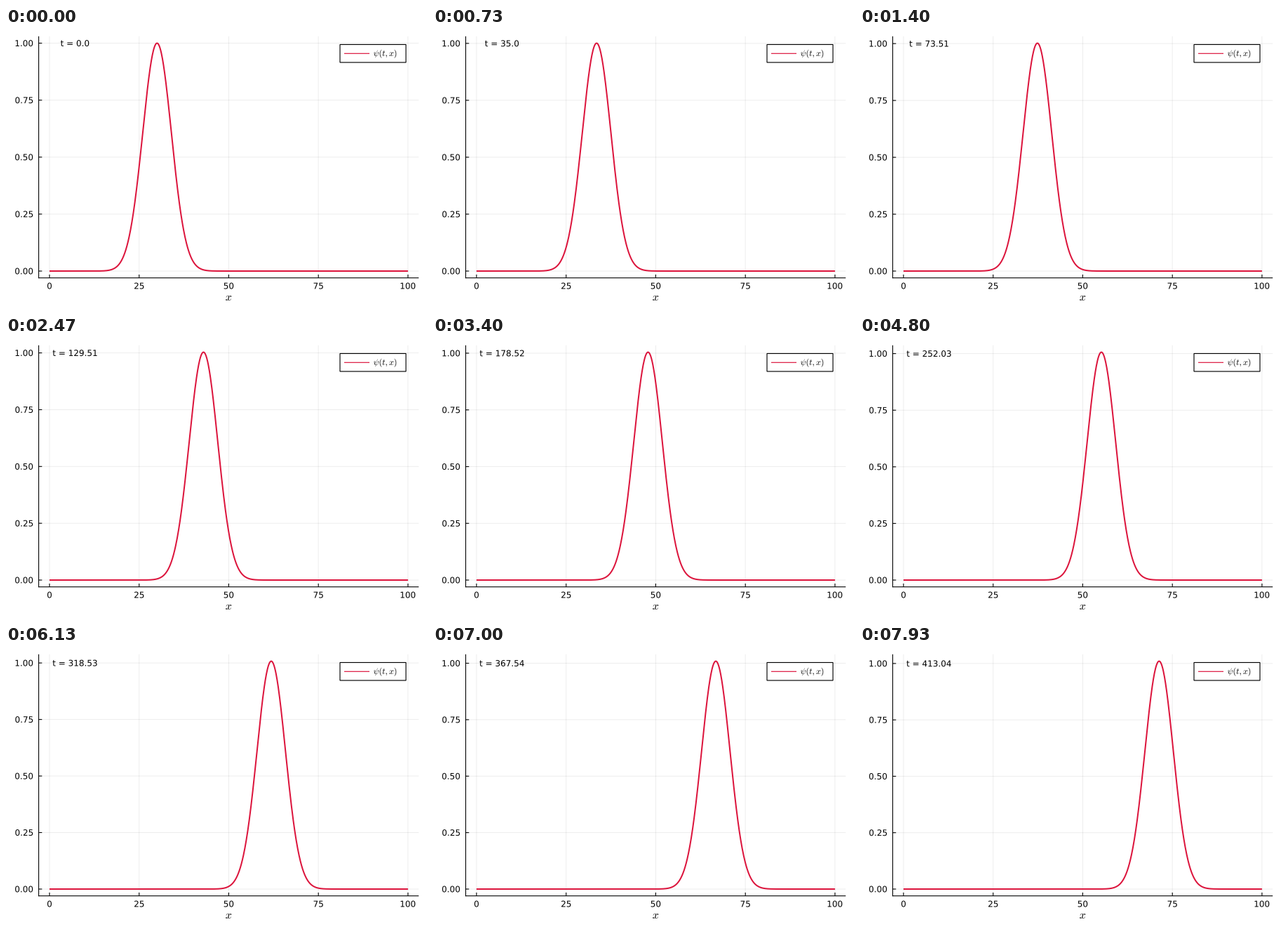
Write a matplotlib script that moves like this. It is 600 by 400 pixels and loops after 8000 ms.

```python
import numpy as np
import matplotlib.pyplot as plt
from matplotlib.animation import FuncAnimation
from matplotlib.patches import PathPatch, Rectangle
from matplotlib.textpath import TextPath
from matplotlib.transforms import Affine2D

W, H, DPI = 600, 400, 100
PX = 72 / DPI
FRAMES, LOOP = 120, 8000
STEP = 35 * 1000 / 9999
CRIMSON = "#dc143c"

plt.rcParams["font.family"] = "DejaVu Sans"
plt.rcParams["mathtext.fontset"] = "cm"

# plot area in pixels, y measured from the top
LEFT, RIGHT, TOP, BOTTOM = 46.6, 588.2, 11.8, 355.7
X0, X100 = 62.0, 572.9
Y_ZERO, Y_PEAK = 346.0, 21.6

fig = plt.figure(figsize=(W / DPI, H / DPI), dpi=DPI, facecolor="white")
ax = fig.add_axes([0, 0, 1, 1])
ax.set_xlim(0, W)
ax.set_ylim(H, 0)
ax.axis("off")


def line(xs, ys, color="black", width=1.1, z=2, **kw):
    return ax.plot(xs, ys, color=color, lw=width * PX, zorder=z, snap=False,
                   solid_capstyle="butt", **kw)[0]


def text_path(s, x, base, size=12, align=0.5):
    path = TextPath((0, 0), s, size=size)
    box = path.get_extents()
    dx = x - box.x0 - align * box.width
    return Affine2D().scale(1, -1).translate(dx, base).transform_path(path)


def text(*args, **kw):
    patch = PathPatch(text_path(*args, **kw), fc="black", lw=0, zorder=5,
                      snap=False)
    return ax.add_patch(patch)


def to_x(v):
    return X0 + (X100 - X0) * v / 100


# fixed parts
for v in range(0, 101, 25):
    px = to_x(v)
    line([px, px], [TOP, BOTTOM], width=1, z=1, alpha=0.07)
    line([px, px], [BOTTOM, BOTTOM - 4.7])
    text(str(v), px, 371.4)
line([LEFT, LEFT], [TOP, BOTTOM + 0.5])
line([LEFT - 0.5, RIGHT], [BOTTOM, BOTTOM])
text("$x$", 317.2, 388, size=16)

ax.add_patch(Rectangle((476, 23.5), 94, 25.5, fc="white", ec="black",
                       lw=1.15 * PX, zorder=4, snap=False))
line([482, 518], [36.3, 36.3], CRIMSON, 1.2, z=5)
text(r"$\psi(t,x)$", 524, 39.8, align=0)

# moving parts
levels = [0, 0.25, 0.5, 0.75, 1]
grid = [line([], [], width=1, z=1, alpha=0.07) for _ in levels]
ticks = [line([], []) for _ in levels]
labels = [text(f"{v:.2f}", 38.2, 0, align=1) for v in levels]
clock = text("t = 0.0", 98.1, 0)
curve = line([], [], CRIMSON, 2, z=3, solid_joinstyle="round")
xs = np.linspace(0, 100, 1001)


def update(i):
    t = i * STEP
    var = 16 - 0.00078 * t
    peak = (16 / var) ** 0.5
    scale = (Y_ZERO - Y_PEAK) / peak

    def to_y(v):
        return Y_ZERO - scale * v

    for v, g, tick, lab in zip(levels, grid, ticks, labels):
        y = to_y(v)
        g.set_data([LEFT, RIGHT], [y, y])
        tick.set_data([LEFT, LEFT + 4.7], [y, y])
        lab.set_path(text_path(f"{v:.2f}", 38.2, y + 4.4, align=1))

    psi = peak * np.exp(-(xs - 30 - 0.1 * t) ** 2 / (2 * var))
    curve.set_data(to_x(xs), to_y(psi))
    clock.set_path(text_path(f"t = {round(t, 2)}", 98.1, to_y(1) + 4.4))
    return [*grid, *ticks, *labels, clock, curve]


anim = FuncAnimation(fig, update, frames=FRAMES, interval=LOOP / FRAMES,
                     repeat=True, repeat_delay=0, blit=False)
plt.show()
```
